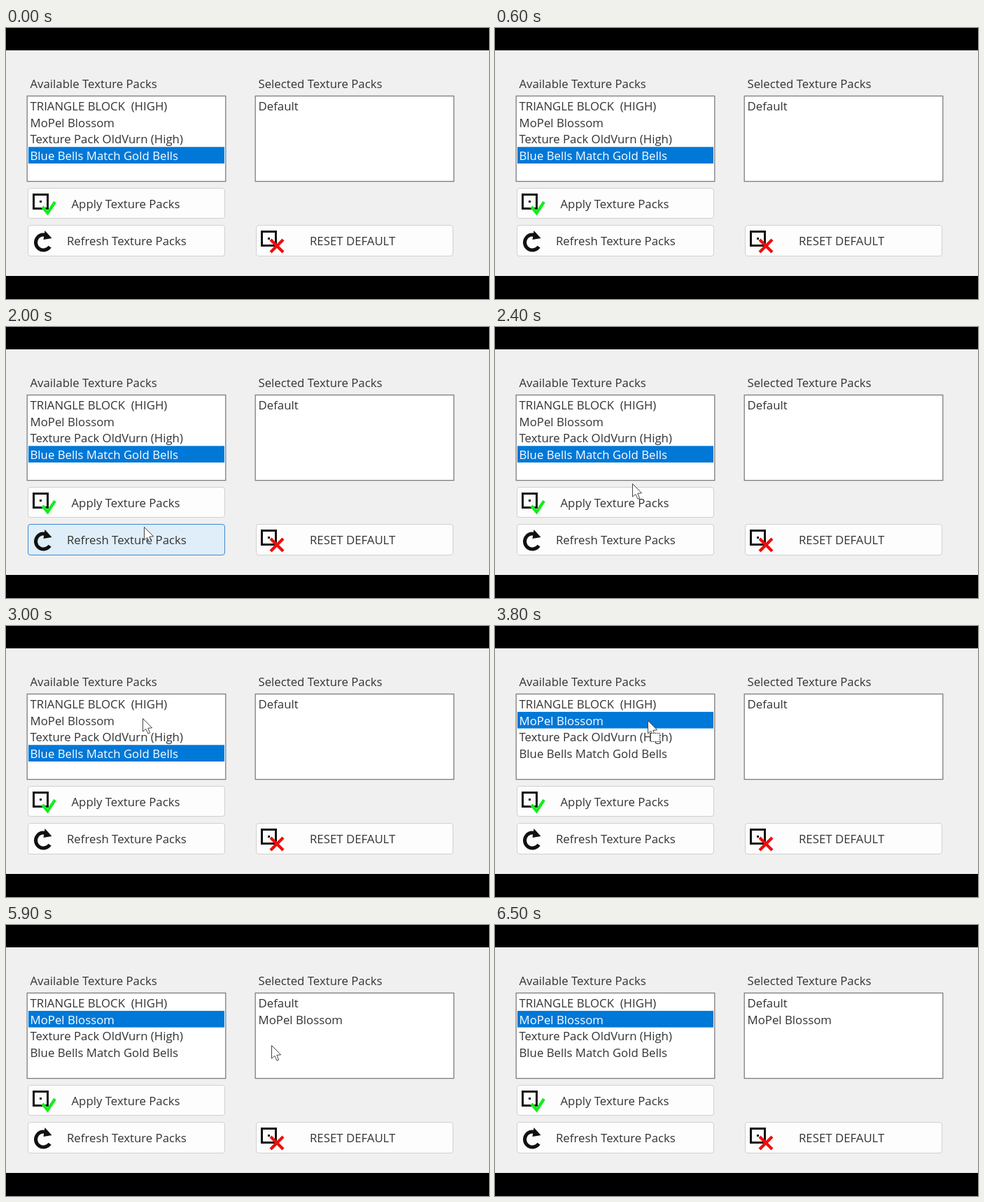
These frames come from a looping animation (690 by 388 pixels, 7.8 s). An HTML page with a canvas:

```html
<!DOCTYPE html>
<html lang="en">
<head>
<meta charset="utf-8">
<title>Texture Packs</title>
<style>
html, body { margin: 0; width: 100%; height: 100%; overflow: hidden; background: #000; }
canvas { display: block; width: 690px; height: 388px; }
</style>
</head>
<body>
<canvas id="stage" width="690" height="388"></canvas>
<script>
const ctx = document.getElementById('stage').getContext('2d');
const LOOP = 7800, STEP = 100;
const ENTER_AT = 1700, SELECT_AT = 3400, DRAG_AT = 3600, DROP_AT = 4800, EXIT_AT = 6400;
const INK = '#333', BLACK = '#111', GREEN = '#12ee1c', RED = '#f00c0c';
const ROW = 23.7;

const packs = [
  'TRIANGLE BLOCK  (HIGH)',
  'MoPel Blossom',
  'Texture Pack OldVurn (High)',
  'Blue Bells Match Gold Bells'
];

const progress = (t, from, to) => Math.min(1, Math.max(0, (t - from) / (to - from)));
const smooth = k => k * k * (3 - 2 * k);

// Enter from below, drag to the right list, circle back, leave to the right
function pointerAt(t) {
  if (t < ENTER_AT || t > EXIT_AT) return null;
  const enter = progress(t, ENTER_AT, 3000);
  const drag = smooth(progress(t, DRAG_AT, 4500));
  const settle = progress(t, DROP_AT, 5700);
  const exit = progress(t, 6200, EXIT_AT);
  return {
    x: 198 - 3 * enter + 185 * drag + 19 * Math.sin(Math.PI * settle) - settle + 250 * exit,
    y: 332 - 200 * enter + 26 * drag + 14 * smooth(settle) + 127 * exit
  };
}

function text(str, x, y, color = INK) {
  ctx.fillStyle = color;
  ctx.fillText(str, x, y);
}

function fill(x, y, w, h, color) {
  ctx.fillStyle = color;
  ctx.fillRect(x, y, w, h);
}

function frame(x, y, w, h, color, width) {
  ctx.strokeStyle = color;
  ctx.lineWidth = width;
  ctx.strokeRect(x, y, w, h);
}

function trace(points) {
  ctx.beginPath();
  points.forEach(([x, y]) => ctx.lineTo(x, y));
}

function line(points, color, width) {
  trace(points);
  ctx.strokeStyle = color;
  ctx.lineWidth = width;
  ctx.stroke();
}

function list(x, title, items, selected) {
  text(title, x + 4.5, 86);
  fill(x, 97, 284, 123, '#fff');
  frame(x + 0.2, 97.4, 283.6, 122.2, '#7d7d7d', 1.3);
  items.forEach((item, i) => {
    const hit = i === selected;
    if (hit) fill(x + 2, 99.2 + i * ROW, 280, ROW, '#0078d7');
    text(item, x + 4.5, 118 + i * ROW, hit ? '#fff' : INK);
  });
}

function button(x, y, h, label, labelX, pointer) {
  const hot = pointer && pointer.x > x && pointer.x < x + 282 &&
    pointer.y > y && pointer.y < y + h;
  ctx.beginPath();
  ctx.roundRect(x + 0.5, y + 0.5, 281, h - 1, 3.5);
  ctx.fillStyle = hot ? '#e0eef9' : '#fdfdfd';
  ctx.fill();
  ctx.strokeStyle = hot ? '#3f8acb' : '#d0d0d0';
  ctx.lineWidth = 1;
  ctx.stroke();
  text(label, labelX, y + 29);
}

function blockIcon(x, y) {
  frame(x + 1.5, y + 1.5, 20, 20, BLACK, 3);
  fill(x + 10, y + 10, 3, 3, BLACK);
}

function refreshIcon(x, y) {
  ctx.beginPath();
  ctx.arc(x, y, 11, 0.6, 4.9);
  ctx.strokeStyle = BLACK;
  ctx.lineWidth = 5;
  ctx.stroke();
  trace([[x + 2, y - 17], [x + 12, y - 6], [x, y - 4]]);
  ctx.fillStyle = BLACK;
  ctx.fill();
}

function drawPointer({ x, y }, dragging) {
  ctx.save();
  ctx.translate(Math.round(x), Math.round(y));
  trace([[0.5, 0.5], [0.5, 19], [4.8, 15.4], [8, 22.2], [10.6, 21], [7.8, 14.3], [13.6, 13.8]]);
  ctx.closePath();
  ctx.fillStyle = '#fff';
  ctx.fill();
  ctx.strokeStyle = '#444';
  ctx.lineWidth = 1;
  ctx.stroke();
  if (dragging) {
    fill(4, 18, 14, 13, '#fff');
    ctx.setLineDash([2, 1]);
    frame(4.5, 18.5, 13, 12, '#333', 1);
  }
  ctx.restore();
}

function draw(t) {
  const pointer = pointerAt(t);
  fill(0, 0, 690, 388, '#000');
  fill(0, 32, 690, 323, '#f0f0f0');
  ctx.font = '16.8px "Open Sans", "Noto Sans", sans-serif';

  list(30, 'Available Texture Packs', packs, t < SELECT_AT ? 3 : 1);
  list(356, 'Selected Texture Packs', t < DROP_AT ? ['Default'] : ['Default', packs[1]], -1);

  button(31, 229, 44, 'Apply Texture Packs', 93.5, pointer);
  button(31, 282, 45, 'Refresh Texture Packs', 87, pointer);
  button(357, 282, 45, 'RESET DEFAULT', 434, pointer);

  blockIcon(38, 237);
  line([[52, 256], [59.5, 265], [70, 249]], GREEN, 4.3);
  refreshIcon(53.5, 307);
  blockIcon(364, 290);
  line([[378, 303], [396, 321]], RED, 4.3);
  line([[396, 303], [378, 321]], RED, 4.3);

  if (pointer) drawPointer(pointer, t >= DRAG_AT && t < DROP_AT);
}

const start = performance.now();
function tick() {
  const t = (performance.now() - start) % LOOP;
  draw(Math.floor(t / STEP) * STEP);
  requestAnimationFrame(tick);
}
tick();
</script>
</body>
</html>
```
